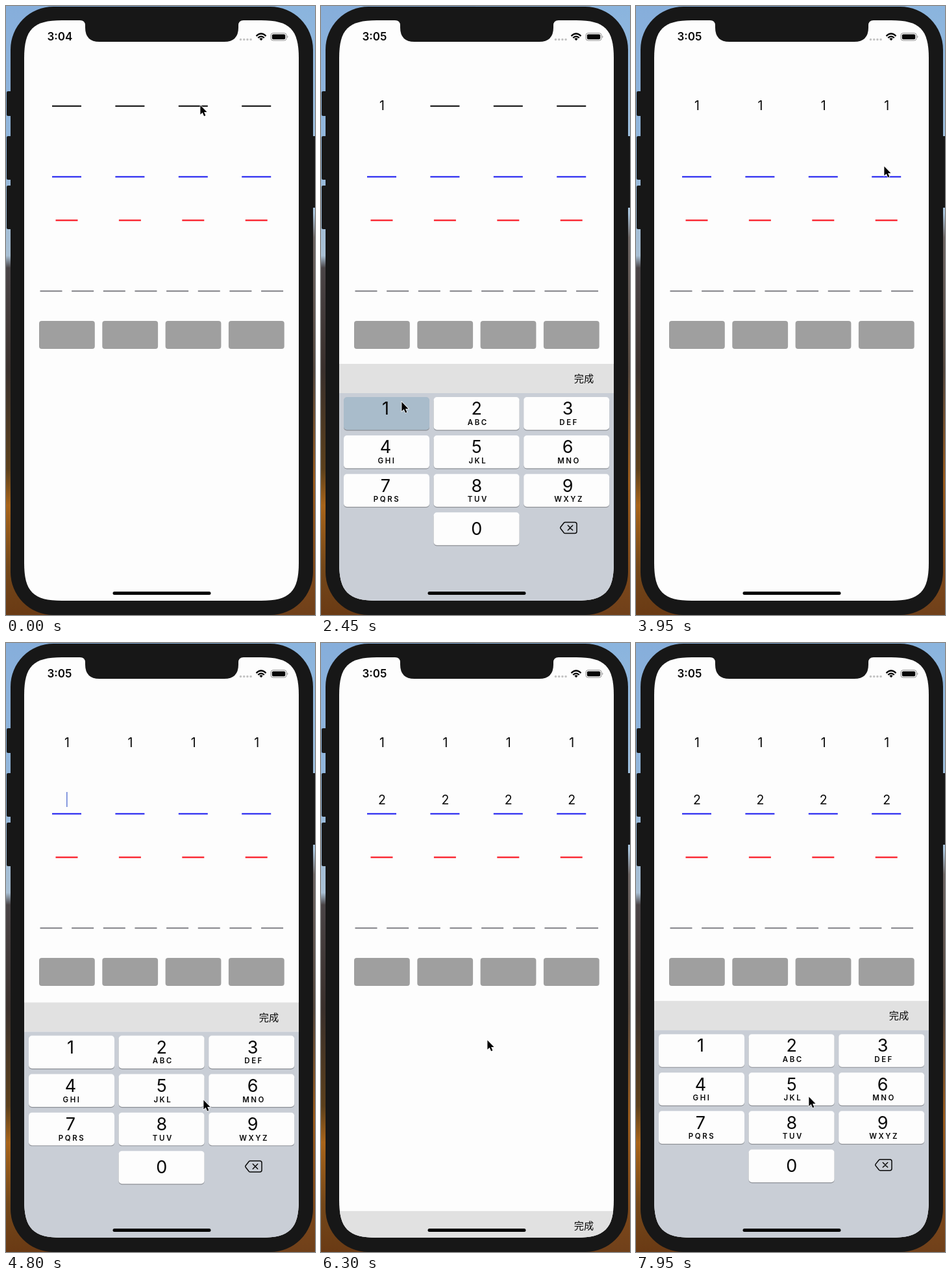
An HTML page for the animation above (8 s loop, 476x936 px).

```html
<!DOCTYPE html>
<html lang="zh">
<head>
<meta charset="utf-8">
<style>
  html, body { margin: 0; width: 100%; height: 100%; overflow: hidden; background: #171717; }
  svg { display: block; width: 476px; height: 936px; font-family: Inter, Roboto, sans-serif; fill: #080808; }
  .mid { text-anchor: middle; }
  .cell { font-size: 19.5px; }
  .key { font-size: 27px; }
  .letters { font-size: 11.5px; font-weight: 600; letter-spacing: 2.5px; }
  .done { font: 15.2px "Noto Sans CJK SC", "Noto Sans CJK", sans-serif; }
</style>
</head>
<body>
<svg viewBox="0 0 476 936">
  <defs>
    <linearGradient id="left" x2="0" y2="1">
      <stop offset="0" stop-color="#86aedb"/>
      <stop offset=".25" stop-color="#94b8dc"/>
      <stop offset=".41" stop-color="#a9c0d4"/>
      <stop offset=".43" stop-color="#4a4446"/>
      <stop offset=".6" stop-color="#3a302c"/>
      <stop offset=".76" stop-color="#5c401c"/>
      <stop offset=".82" stop-color="#a8641a"/>
      <stop offset=".92" stop-color="#74481a"/>
      <stop offset="1" stop-color="#6a3a14"/>
    </linearGradient>
    <linearGradient id="right" x2="0" y2="1">
      <stop offset="0" stop-color="#8ab4de"/>
      <stop offset=".34" stop-color="#a8c4dc"/>
      <stop offset=".38" stop-color="#6c6462"/>
      <stop offset=".6" stop-color="#54463c"/>
      <stop offset=".78" stop-color="#9a5a1a"/>
      <stop offset="1" stop-color="#70401a"/>
    </linearGradient>
    <clipPath id="screen">
      <path d="M28 80C28 36 42 22 86 22H393C437 22 451 36 451 80V856C451 900 437 914 393 914H86C42 914 28 900 28 856Z"/>
    </clipPath>
  </defs>

  <rect width="238" height="936" fill="url(#left)"/>
  <rect x="238" width="238" height="936" fill="url(#right)"/>
  <g fill="#171717">
    <rect x="1" y="131" width="9" height="38" rx="2"/>
    <rect x="1" y="200" width="9" height="67" rx="2"/>
    <rect x="1" y="276" width="9" height="67" rx="2"/>
    <rect x="470" y="200" width="8" height="110" rx="2"/>
    <rect x="7" y="1" width="466" height="935" rx="66"/>
  </g>

  <g clip-path="url(#screen)">
    <rect x="28" y="22" width="423" height="892" fill="#fdfdfd"/>
    <g id="form"></g>
    <rect id="caret" x="93" y="229" width="1.6" height="23" fill="#6c84d8"/>
    <g id="keyboard">
      <rect x="28" y="550" width="423" height="45" fill="#e1e1e1"/>
      <rect x="28" y="595" width="423" height="325" fill="#c9ced6"/>
      <text class="done" x="389.7" y="578.3">完成</text>
      <g fill="none" stroke="#080808" stroke-width="1.5" stroke-linecap="round" stroke-linejoin="round">
        <path d="M376 793.5H391Q394 793.5 394 796.5V807.5Q394 810.5 391 810.5H376Q375 810.5 374.3 809.7L369 803Q368.4 802 369 801L374.3 794.3Q375 793.5 376 793.5Z"/>
        <path d="M380.3 798.3L387.7 805.7M387.7 798.3L380.3 805.7"/>
      </g>
    </g>
    <rect x="164.5" y="900" width="151" height="5" rx="2.5" fill="#050505"/>
  </g>

  <path fill="#171717" d="M114 21V22Q122 22 122 30V33Q122 55 144 55H336Q358 55 358 33V30Q358 22 366 22V21Z"/>

  <text id="clock" x="63.5" y="53.2" font-size="17" font-weight="600"></text>
  <g fill="#c2c2c2">
    <circle cx="361.5" cy="51.5" r="1.7"/><circle cx="366.7" cy="51.5" r="1.7"/>
    <circle cx="371.9" cy="51.5" r="1.7"/><circle cx="377.1" cy="51.5" r="1.7"/>
  </g>
  <g fill="none" stroke="#080808" stroke-width="2.3">
    <path d="M385.5 46.2Q393 38.8 400.5 46.2"/>
    <path d="M388.2 49Q393 44.4 397.8 49"/>
    <path d="M390.3 50.3Q393 48.2 395.7 50.3L393 53.2Z" fill="#080808" stroke="none"/>
  </g>
  <rect x="408" y="41.7" width="24" height="11.3" rx="3.3" fill="none" stroke="#909090"/>
  <rect x="409.8" y="43.5" width="20.4" height="7.7" rx="1.8"/>
  <path d="M433.3 45.3Q435.6 47.3 433.3 49.4Z" fill="#909090"/>

  <g id="pointer">
    <path d="M.4 .4V14.8L3.7 11.7L6.1 17.2L8.4 16.2L6.1 10.9H10.5Z"
          stroke="#fff" stroke-width="1.4" paint-order="stroke" fill="#000"/>
  </g>
</svg>

<script>
const LOOP = 8000, STEP = 50, TRAVEL = 364;
const WHITE = "#fdfdfd", PRESSED = "#a9bccb";
const $ = id => document.getElementById(id);

function add(parent, tag, attrs, text = "") {
  const node = document.createElementNS("http://www.w3.org/2000/svg", tag);
  for (const name in attrs) node.setAttribute(name, attrs[name]);
  node.textContent = text;
  parent.append(node);
  return node;
}

// Code fields
function row(count, x, y, width, height, gap, fill, rx = 0) {
  return Array.from({ length: count }, (_, i) =>
    add($("form"), "rect", { x: x + i * gap, y, width, height, fill, rx }));
}
const blackLines = row(4, 71, 152.8, 45, 2, 97.4, "#080808");
row(4, 71, 261.5, 45, 2, 97.4, "#1414f0");
row(4, 76.5, 328.3, 34, 2.2, 97.4, "#fa1420");
row(8, 52.5, 437.2, 34, 2, 48.65, "#828288");
row(4, 51, 484, 85.8, 43, 97.3, "#9f9f9f", 4);

const digits = (label, y) => [0, 1, 2, 3].map(i =>
  add($("form"), "text", { class: "mid cell", x: 94 + i * 97.4, y }, label));
const ones = digits("1", 160), twos = digits("2", 248);

// Number pad
const LETTERS = ["", "ABC", "DEF", "GHI", "JKL", "MNO", "PQRS", "TUV", "WXYZ"];
function addKey(label, col, line, letters) {
  const x = 35 + col * 138.6, y = 601 + line * 59.1, center = 99.5 + col * 140.3;
  const shape = { x, y, width: 132, height: 50.5, rx: 5, fill: WHITE };
  add($("keyboard"), "rect", { ...shape, y: y + 1.2, fill: "#8d9096" });
  const cap = add($("keyboard"), "rect", shape);
  add($("keyboard"), "text", { class: "mid key", x: center, y: y + (line < 3 ? 27.3 : 34.5) }, label);
  add($("keyboard"), "text", { class: "mid letters", x: center + 2, y: y + 43 }, letters);
  return cap;
}
const keys = LETTERS.map((letters, i) => addKey(i + 1, i % 3, Math.floor(i / 3), letters));
addKey(0, 1, 3, "");

// Timeline, in ms
const presses = first => [0, 1, 2, 3].map(i => first + i * 220);
const PRESS_ONE = presses(2400), PRESS_TWO = presses(5435);
const SLIDES = [[250, 1], [PRESS_ONE[3], 0], [4412, 1], [PRESS_TWO[3], 0], [7380, 1]];
const POINTER = [
  [0, 299, 152], [1300, 299, 152], [2050, 124, 608], [3300, 124, 608],
  [3900, 382, 246], [4430, 382, 246], [4780, 304, 702], [4820, 304, 702],
  [5250, 256, 610], [6350, 256, 610], [7050, 287, 322], [7430, 287, 322],
  [7900, 266, 697], [8000, 266, 697]
];

function keyboardOffset(t) {
  const slide = SLIDES.filter(([start]) => start <= t).pop();
  if (!slide) return TRAVEL;
  const [start, shown] = slide;
  const w = 18.26 * (t - start) / 1000;
  const rest = (1 + w) * Math.exp(-w);
  return TRAVEL * (shown ? rest : 1 - rest);
}

function pointerAt(t) {
  const i = POINTER.findIndex(([time]) => time > t);
  const [t0, x0, y0] = POINTER[i - 1], [t1, x1, y1] = POINTER[i];
  const p = (t - t0) / (t1 - t0), e = p * p * (3 - 2 * p);
  return [x0 + (x1 - x0) * e, y0 + (y1 - y0) * e];
}

const show = (node, on) => node.setAttribute("visibility", on ? "visible" : "hidden");
const isDown = (times, t) => times.some(p => t >= p && t < p + 120);

function draw(t) {
  $("clock").textContent = t < 500 ? "3:04" : "3:05";
  $("keyboard").setAttribute("transform", `translate(0 ${keyboardOffset(t)})`);
  $("pointer").setAttribute("transform", `translate(${pointerAt(t)})`);
  for (let i = 0; i < 4; i++) {
    show(ones[i], t >= PRESS_ONE[i]);
    show(blackLines[i], t < PRESS_ONE[i]);
    show(twos[i], t >= PRESS_TWO[i]);
  }
  keys[0].setAttribute("fill", isDown(PRESS_ONE, t) ? PRESSED : WHITE);
  keys[1].setAttribute("fill", isDown(PRESS_TWO, t) ? PRESSED : WHITE);
  const filled = PRESS_TWO.filter(p => p <= t).length;
  $("caret").setAttribute("x", 93 + filled * 97.4);
  show($("caret"), t >= 4412 && filled < 4);
}

function tick() {
  draw(Math.floor(performance.now() % LOOP / STEP) * STEP);
  requestAnimationFrame(tick);
}
tick();
</script>
</body>
</html>
```
